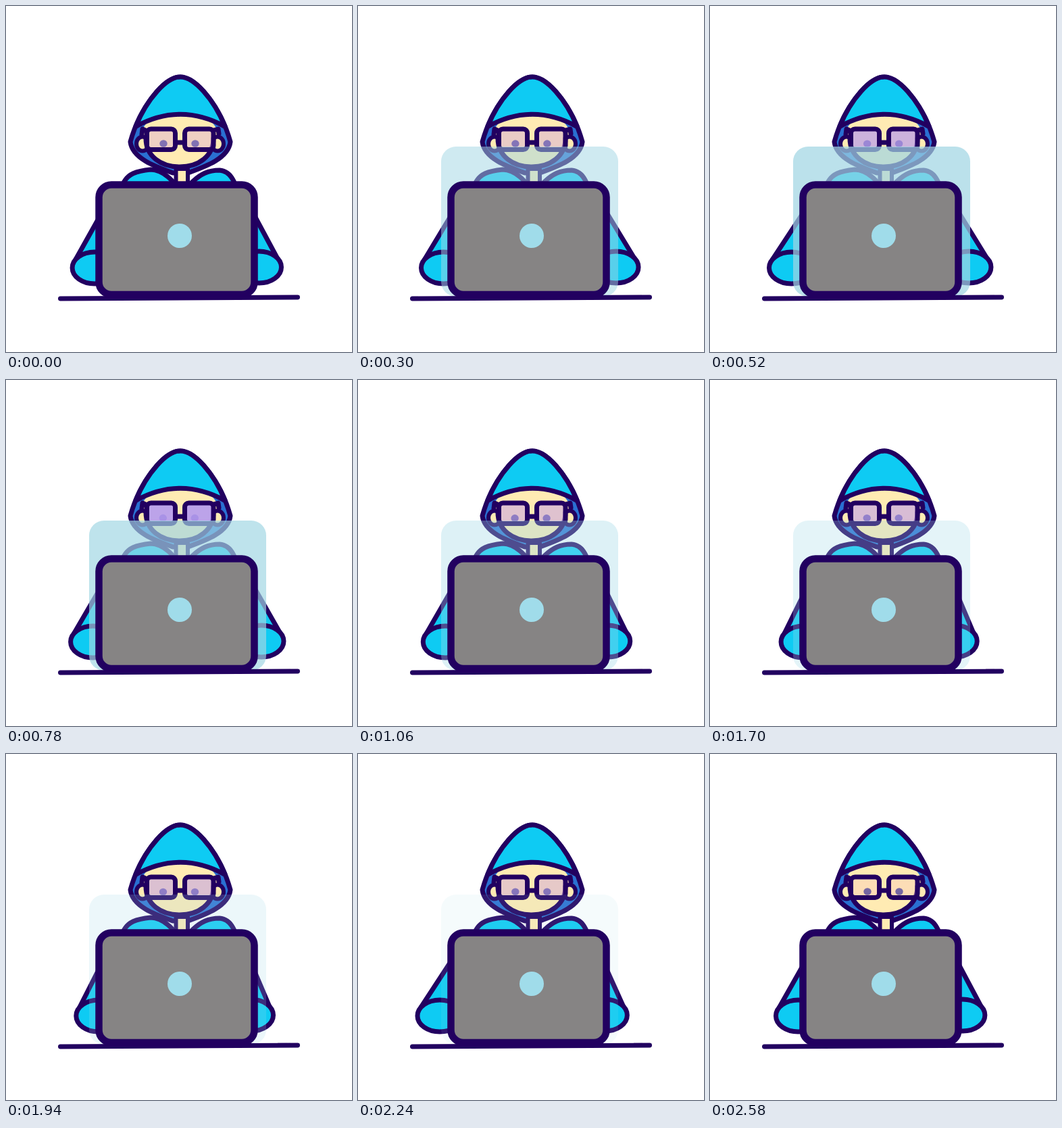
Write an HTML page that moves like this. It is 512x512 px and loops after 2600 ms.

```html
<!DOCTYPE html>
<html lang="en">
<head>
<meta charset="utf-8">
<title>Coder at a laptop</title>
<style>
  html, body { margin: 0; width: 100%; height: 100%; overflow: hidden; background: #fff; }
  svg { display: block; width: 100vw; height: 100vh; }
  .ink { stroke: #220060; stroke-width: 7; stroke-linecap: round; stroke-linejoin: round; }
  .thin { stroke-width: 6; }
  .cyan { fill: #0ecbf3; }
  .blue { fill: #2a70d2; }
  .skin { fill: #ffebb3; }
  .none { fill: none; }
</style>
</head>
<body>
<svg viewBox="0 0 512 512">
  <defs>
    <g id="lenses">
      <rect x="208.500" y="182" width="42" height="30.500" rx="6"/>
      <rect x="264.500" y="182" width="42.500" height="30.500" rx="6"/>
    </g>
  </defs>
  <g class="ink cyan">
    <path id="armL"/>
    <ellipse id="handL" cy="387.500" rx="33" ry="23.500"/>
    <path id="armR"/>
    <ellipse id="handR" cy="386.500" rx="33" ry="23.500"/>
    <path d="M173 264C179 248 194 244 214 242C228 242 238 250 247 260"/>
    <path d="M274 262C288 248 300 243 316 243C328 244 335 253 339 264"/>
  </g>
  <path class="ink blue" d="M258 105C234 105 198 150 184 201C187 226 222 238 247 247H269C294 238 329 226 332 201C318 150 282 105 258 105Z"/>
  <path class="ink skin thin" d="M251.500 264V241H269V264"/>
  <path class="skin" d="M198 198A59 44 0 0 1 316 198Z"/>
  <g class="ink skin">
    <ellipse class="thin" cx="202" cy="204" rx="9" ry="10.500"/>
    <ellipse class="thin" cx="313" cy="204" rx="9" ry="10.500"/>
    <path d="M207 196C207 222 229 238 257 238S307 222 307 196"/>
  </g>
  <path class="ink cyan" d="M258 105C237.600 105 208.500 137.500 191.700 178.600Q258 142 324.300 178.600C307.500 137.500 278.400 105 258 105Z"/>
  <use href="#lenses" fill="#f7c9b8" opacity=".4"/>
  <g id="eyes" fill="#7466a2">
    <ellipse cx="233" cy="203.500" rx="5.700" ry="5.300"/>
    <ellipse cx="280" cy="203.500" rx="5.700" ry="5.300"/>
  </g>
  <use id="tint" href="#lenses" fill="#b29af2"/>
  <g class="ink none">
    <use href="#lenses"/>
    <path d="M251 202H264M208 185L202 182L201 190M307 184L314 182L315 189"/>
  </g>
  <rect id="glow" x="123" y="208" width="262" height="222" rx="22" fill="#a0d6e4"/>
  <path class="ink none" d="M80.500 433L431.500 431"/>
  <rect class="ink" x="137.500" y="264.500" width="230" height="162.500" rx="18.500" fill="#868484" style="stroke-width:10.500"/>
  <circle cx="257" cy="340" r="18" fill="#a0dcea"/>
</svg>
<script>
const LOOP = 2600;
const RISE_END = 1260, RELIGHT = 1640, DARK = 2580;
const el = id => document.getElementById(id);

// A cosine that runs n times per loop and peaks at the given time.
const wave = (t, n, peak) => Math.cos(2 * Math.PI * n * (t - peak) / LOOP);

// Progress from a to b, held to 0..1.
const span = (t, a, b) => Math.min(1, Math.max(0, (t - a) / (b - a)));
const bump = (t, a, b) => Math.sin(Math.PI * span(t, a, b));

function drawArm(side, x, dir) {
  const cx = x + dir * 36.5;
  const shoulder = dir > 0 ? 163 : 345;
  el("hand" + side).setAttribute("cx", cx);
  el("arm" + side).setAttribute("d",
    `M${shoulder} 268L${cx - dir * 28} 375L${cx + dir * 30} 387L${shoulder + dir * 30} 300Z`);
}

function draw(t) {
  drawArm("L", 91.4 + 3 * wave(t, 1, 1820) + 2.6 * wave(t, 2, 490) - 7 * wave(t, 3, 510), 1);
  drawArm("R", 407.2 + 10.5 * wave(t, 1, 450) + 2 * wave(t, 2, 450), -1);

  // The screen swells once, goes dark, then flares up again and fades.
  const fade = span(t, RELIGHT, DARK);
  const relit = t >= RELIGHT;
  el("glow").setAttribute("opacity", relit ? .3 * (1 - fade) : .74 * bump(t, 0, RISE_END));
  el("tint").setAttribute("opacity",
    relit ? .5 * (1 - fade * fade) : .2 + .67 * bump(t, 200, RISE_END) ** 2);

  const look = (1 - wave(t, 1, 0)) / 2;
  el("eyes").setAttribute("transform", `translate(${-look} ${look})`);
}

const start = performance.now();
function tick() {
  draw((performance.now() - start) % LOOP);
  requestAnimationFrame(tick);
}
tick();
</script>
</body>
</html>
```
